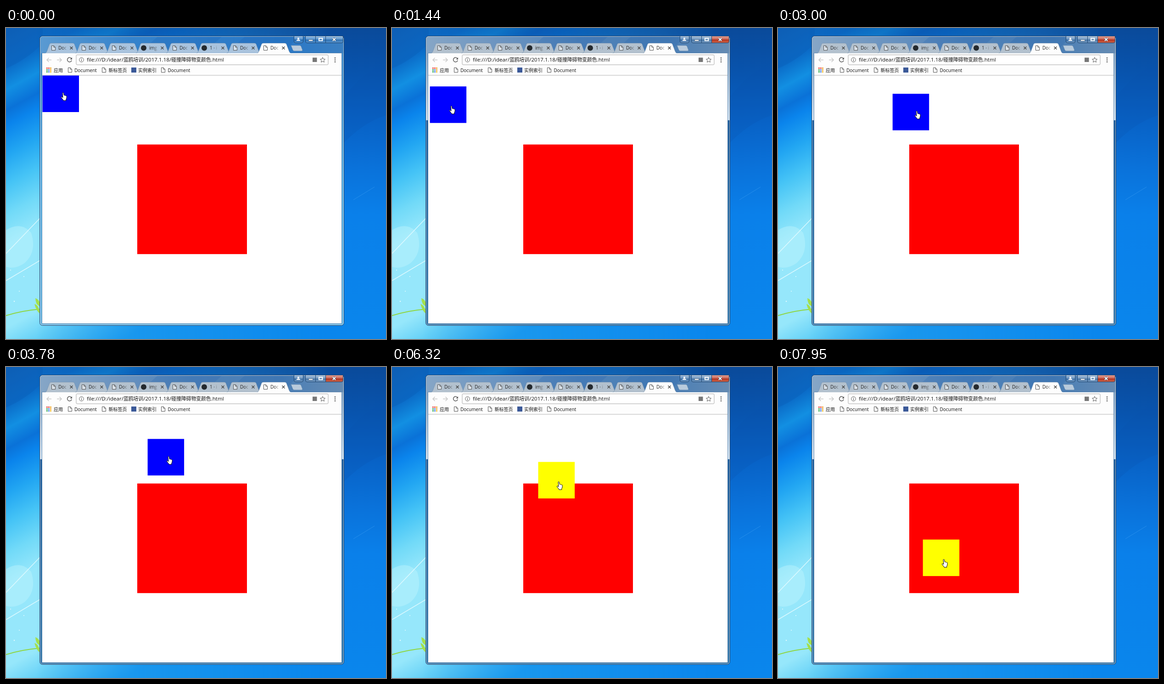
An HTML page that plays this animation: 828 by 677 pixels, repeating every 8 s.

```html
<!DOCTYPE html>
<html lang="zh">
<head>
<meta charset="utf-8">
<title>碰撞障碍物变颜色</title>
<style>
  html, body { margin: 0; width: 100%; height: 100%; overflow: hidden; }
  svg { display: block; width: 828px; height: 677px; }
  text { font: 10px "Open Sans", "Noto Sans CJK SC", "Noto Sans CJK", sans-serif; fill: #111; white-space: pre; }
  .url { font-size: 11.6px; }
  .url .cjk { font-size: 10.8px; }
  .line { fill: none; stroke: #5a5a5a; }
</style>
</head>
<body>
<svg viewBox="0 0 828 677">
  <defs>
    <linearGradient id="skyLeft" gradientUnits="userSpaceOnUse" x1="0" y1="0" x2="343" y2="629">
      <stop offset="0" stop-color="#1062b8"/><stop offset=".105" stop-color="#0b6cc8"/>
      <stop offset=".165" stop-color="#128fe2"/><stop offset=".22" stop-color="#0a72d8"/>
      <stop offset=".26" stop-color="#0a84ec"/><stop offset=".34" stop-color="#22a6f2"/>
      <stop offset=".42" stop-color="#46c4f6"/><stop offset=".5" stop-color="#72daf8"/>
      <stop offset=".58" stop-color="#96e7fb"/><stop offset=".8" stop-color="#96e7fb"/>
      <stop offset=".87" stop-color="#68d2f7"/><stop offset="1" stop-color="#2aaaf0"/>
    </linearGradient>
    <linearGradient id="skyRight" x2="0" y2="1">
      <stop offset="0" stop-color="#0a4a9a"/><stop offset=".15" stop-color="#0854ae"/>
      <stop offset=".3" stop-color="#0862c6"/><stop offset=".45" stop-color="#0a72da"/>
      <stop offset=".6" stop-color="#0a80ea"/><stop offset="1" stop-color="#0a86ec"/>
    </linearGradient>
    <linearGradient id="fade">
      <stop offset=".08" stop-color="#000"/><stop offset=".35" stop-color="#888"/><stop offset=".85" stop-color="#fff"/>
    </linearGradient>
    <mask id="toRight"><path d="M0 0H828V677H0z" fill="url(#fade)"/></mask>

    <linearGradient id="titleIdle">
      <stop offset="0" stop-color="#5a9ad2"/><stop offset=".3" stop-color="#3583cc"/>
      <stop offset=".8" stop-color="#2a78c6"/><stop offset="1" stop-color="#3a7fc2"/>
    </linearGradient>
    <linearGradient id="titleLive">
      <stop offset="0" stop-color="#86a6c6"/><stop offset=".25" stop-color="#6a93c0"/>
      <stop offset=".5" stop-color="#4f82b8"/><stop offset=".8" stop-color="#4a7eb5"/><stop offset="1" stop-color="#658bb3"/>
    </linearGradient>
    <linearGradient id="sideIdle" x2="0" y2="1">
      <stop offset="0" stop-color="#4189c8"/><stop offset=".5" stop-color="#5cb0e2"/><stop offset="1" stop-color="#6fb9e2"/>
    </linearGradient>
    <linearGradient id="sideLive" x2="0" y2="1">
      <stop offset="0" stop-color="#7296ba"/><stop offset=".29" stop-color="#cfe1f1"/>
      <stop offset=".292" stop-color="#1f5c9a"/><stop offset=".6" stop-color="#2f70a6"/><stop offset="1" stop-color="#3a7bac"/>
    </linearGradient>
    <linearGradient id="closeLive" x2="0" y2="1">
      <stop offset="0" stop-color="#e0a195"/><stop offset=".48" stop-color="#cc6656"/>
      <stop offset=".52" stop-color="#b23220"/><stop offset="1" stop-color="#cf6545"/>
    </linearGradient>
    <linearGradient id="button" x2="0" y2="1">
      <stop offset="0" stop-color="#fff" stop-opacity=".42"/><stop offset=".5" stop-color="#fff" stop-opacity=".22"/>
      <stop offset=".52" stop-color="#036" stop-opacity=".18"/><stop offset="1" stop-color="#fff" stop-opacity=".15"/>
    </linearGradient>
    <linearGradient id="textFade">
      <stop offset=".5" stop-color="#222"/><stop offset="1" stop-color="#222" stop-opacity=".15"/>
    </linearGradient>
    <path id="page" d="M.5 .5H5.2L8.5 3.8V10.5H.5zM5 .5V4H8.5" fill="#fff" fill-opacity=".5" stroke="#555"/>
  </defs>

  <!-- desktop -->
  <path d="M0 0H828V677H0z" fill="url(#skyLeft)"/>
  <path d="M0 0H828V677H0z" fill="url(#skyRight)" mask="url(#toRight)"/>
  <path d="M0 88Q40 72 80 34V0H0z" fill="#0a55ac" opacity=".25"/>
  <path d="M0 440Q32 420 55 446Q68 488 40 512Q20 526 0 520z" fill="#c4f5fd" opacity=".4"/>
  <path d="M736 150Q780 95 828 75V190Q780 205 736 250z" fill="#0a50aa" opacity=".2"/>
  <path d="M0 491L74 414M0 550L74 506" stroke="#e4fbff" stroke-width="1.6" opacity=".85"/>
  <path d="M757 374L803 346" stroke="#3a9cf0" opacity=".6"/>
  <path d="M0 626Q36 615 74 612" fill="none" stroke="#8fd640" stroke-width="2"/>
  <path d="M64 588Q75 592 74 606Q64 602 64 588zM62 601Q72 603 74 622Q66 616 62 601z" fill="#a4e04c"/>
  <g fill="#e4fbff"><circle cx="18" cy="595" r="1.3"/><circle cx="39" cy="541" r="1"/><circle cx="10" cy="527" r="1"/><circle cx="29" cy="573" r="1"/></g>

  <!-- window frame -->
  <rect id="frame" x="73.5" y="17.5" width="663" height="630" rx="6" stroke="#173f6c"/>
  <path id="title" d="M75 55V24Q75 19 80 19H730Q735 19 735 24V55z"/>
  <path d="M330 19H470L430 55H290zM520 19H640L600 55H480z" fill="#0d55a8" opacity=".16"/>
  <rect x="74.5" y="18.5" width="661" height="628" rx="5" fill="none" stroke="#fff" stroke-opacity=".5"/>
  <g stroke="#1d4672">
    <path d="M627.5 17.5H647.5V29Q647.5 32.5 644 32.5H631Q627.5 32.5 627.5 29z" fill="url(#button)"/>
    <path d="M652.5 17.5H696.5V32.5H656Q652.5 32.5 652.5 29zM674.5 17.5V32.5" fill="url(#button)"/>
    <path id="close" d="M696.5 17.5H734.5V29Q734.5 32.5 731 32.5H696.5z"/>
  </g>
  <path d="M633 28V26.5Q637 24 641 26.5V28z" fill="#fff"/><circle cx="637" cy="23" r="2" fill="#fff"/>
  <path d="M659.5 25.5H668.5V28.5H659.5z" fill="#fff" stroke="#43566e" stroke-width=".7"/>
  <path d="M682 22.5H689.5V27.5H682z" fill="none" stroke="#fff" stroke-width="2"/>
  <path d="M712 22L718 28M718 22L712 28" stroke="#334b68" stroke-width="3.2"/>
  <path d="M712 22L718 28M718 22L712 28" stroke="#fff" stroke-width="2"/>

  <!-- browser -->
  <path d="M78.5 54.5H731.5V643.5H78.5z" fill="#fff" stroke="#3d6d9d" stroke-opacity=".7"/>
  <path d="M79 55H731V103H79z" fill="#fdfdfd"/>
  <g id="tabs"></g>
  <path d="M621 38H640Q642 38 643 40L646 48Q646 50 644 50H628Q626 50 625 48z" fill="#b9cbdc" stroke="#5e86ad" stroke-width=".7"/>
  <path d="M79 103H731" stroke="#b4b4b4"/>

  <g class="line" stroke-width="1.5">
    <path d="M99 69.5H89M93.5 65L89 69.5L93.5 74M111 69.5H121M116.5 65L121 69.5L116.5 74" stroke="#c9c9c9"/>
    <path d="M142 66A4.8 4.8 0 1 0 143 70.5"/>
    <path d="M144 64V68.5H139.5z" fill="#5a5a5a" stroke="none"/>
  </g>
  <rect x="153" y="58.5" width="549" height="21.5" rx="2" fill="#fff" stroke="#a9a9a9"/>
  <circle class="line" cx="164.5" cy="69.3" r="4.8"/>
  <path class="line" d="M164.5 68.5V72M164.5 66.2V67.4" stroke-width="1.2"/>
  <text class="url" x="176" y="73.3">file:///D:/idear/<tspan class="cjk">蓝鸥培训</tspan>/2017.1.18/<tspan class="cjk">碰撞障碍物变颜色</tspan>.html</text>
  <rect x="668" y="64.5" width="9.5" height="9.5" fill="#777"/>
  <path class="line" d="M690 64L691.6 67.6L695.5 68L692.6 70.6L693.4 74.5L690 72.5L686.6 74.5L687.4 70.6L684.5 68L688.4 67.6z"/>
  <g fill="#555"><circle cx="717" cy="65.3" r="1.3"/><circle cx="717" cy="69.5" r="1.3"/><circle cx="717" cy="73.7" r="1.3"/></g>

  <g id="apps"></g>
  <text x="104" y="95.5">应用</text>
  <use href="#page" x="135" y="86"/><text x="149" y="95.5">Document</text>
  <use href="#page" x="209" y="86"/><text x="223.5" y="95.5">新标签页</text>
  <rect x="273" y="86" width="11" height="11" fill="#3b5998"/><text x="288" y="95.5">实例索引</text>
  <use href="#page" x="338" y="86"/><text x="352.5" y="95.5">Document</text>

  <!-- page -->
  <rect x="286" y="253.6" width="239" height="238.6" fill="#f00"/>
  <rect id="box" width="79.5" height="79.5"/>
  <path id="hand" stroke="#000" fill="#fff" stroke-linejoin="round"
    d="M3 1.5Q4.3 -.3 5.5 1.5L6.3 6.5Q7.5 5.6 8.3 6.9Q9.5 6.2 10.2 7.5Q11.8 7 12.2 8.7L12 13L10.8 15.5V18H5L4.5 16.5L.8 12Q-.2 10 1.3 9.6L4 11.5z"/>
</svg>
<script>
const $ = id => document.getElementById(id);
const LOOP = 8000, STEP = 120, FOCUS = 430;

// start time, x, y reached, number of steps to get there
const path = [
  [0, 79.5, 103.5], [990, 79.5, 104.5], [1140, 79.5, 110.5], [1290, 79.5, 117.5],
  [1440, 82.6, 127.2], [1560, 89.5, 134.5], [1710, 94, 138.5], [1830, 101, 142],
  [1950, 112, 143.2], [2100, 170.3, 143.2, 3], [2490, 185.3, 143.2], [2640, 249.7, 143.2, 4],
  [3150, 288.3, 149, 3], [3540, 298, 152], [3660, 306, 155], [3780, 308.6, 156.6],
  [3900, 309.4, 157.4], [4050, 312, 164.4, 2], [4320, 312.4, 165.4, 2], [4590, 315.4, 170.4],
  [4870, 317.4, 180, 2], [5140, 319, 183], [6170, 319.3, 195.4], [6320, 316.5, 240.4, 4],
  [6830, 316.5, 267.3], [6950, 314.4, 293.4], [7100, 310.5, 322.4, 2], [7370, 312, 330.5],
  [7520, 314.5, 335.5], [7830, 315, 364.5], [7950, 315.7, 375.6]
];

const moves = [];
let [, px, py] = path[0];
for (const [t, x, y, n = 1] of path) {
  const dx = (x - px) / n, dy = (y - py) / n;
  for (let i = 1; i <= n; i++)
    moves.push({ t: t + (i - 1) * STEP, x: px + dx * i, y: py + dy * i, dx, dy });
  px = x; py = y;
}

const tabs = ['Doc', 'Doc', 'Doc', 'img', 'Doc', '1 · i', 'Doc', 'Doc'];
$('tabs').innerHTML = tabs.map((label, i) => {
  const x = 85 + 66 * i, active = i == tabs.length - 1;
  const icon = /Doc/.test(label)
    ? `<use href="#page" x="${x + 14}" y="38"/>`
    : `<circle cx="${x + 17}" cy="43.5" r="6" fill="#24292e"/>`;
  return `<path class="${active ? '' : 'tab'}" fill="#fdfdfd" stroke="#6d8cab" stroke-width=".6"
      d="M${x} 55Q${x + 3} 54 ${x + 4} 51L${x + 10} 35Q${x + 11} 33 ${x + 14} 33H${x + 60}Q${x + 63} 33 ${x + 64} 35L${x + 70} 51Q${x + 71} 54 ${x + 74} 55"/>
    ${icon}<text x="${x + 29}" y="47.3" style="fill:url(#textFade)">${label}</text>
    <path d="M${x + 54.5} 40.5l6 6m0 -6l-6 6" stroke="#444" stroke-width="1.4"/>`;
}).join('');

const dots = ['#e8453c', '#e8453c', '#f0a020', '#2fa84f', '#3c7de8', '#f0a020', '#2fa84f', '#3c7de8', '#f0b820'];
$('apps').innerHTML = dots.map((c, i) =>
  `<rect x="${88 + i % 3 * 4}" y="${86 + (i / 3 | 0) * 4}" width="2.8" height="2.8" fill="${c}"/>`).join('');

const place = (el, x, y) => el.setAttribute('transform', `translate(${x} ${y})`);

function draw(now) {
  const t = now % LOOP, live = t >= FOCUS;
  const { x, y, dx, dy } = moves.findLast(m => m.t <= t);
  place($('box'), x, y);
  $('box').setAttribute('fill', y + 79.5 > 254 ? '#ff0' : '#00f');
  // the pointer runs half a step ahead of the box it drags
  place($('hand'), Math.round(x + 40.5 + dx / 2), Math.round(y + 36.8 + dy / 2));

  $('frame').setAttribute('fill', live ? 'url(#sideLive)' : 'url(#sideIdle)');
  $('title').setAttribute('fill', live ? 'url(#titleLive)' : 'url(#titleIdle)');
  $('close').setAttribute('fill', live ? 'url(#closeLive)' : 'url(#button)');
  for (const tab of document.querySelectorAll('.tab'))
    tab.setAttribute('fill', live ? '#b3c1ce' : '#a9c3dd');
  requestAnimationFrame(draw);
}
draw(0);
</script>
</body>
</html>
```
